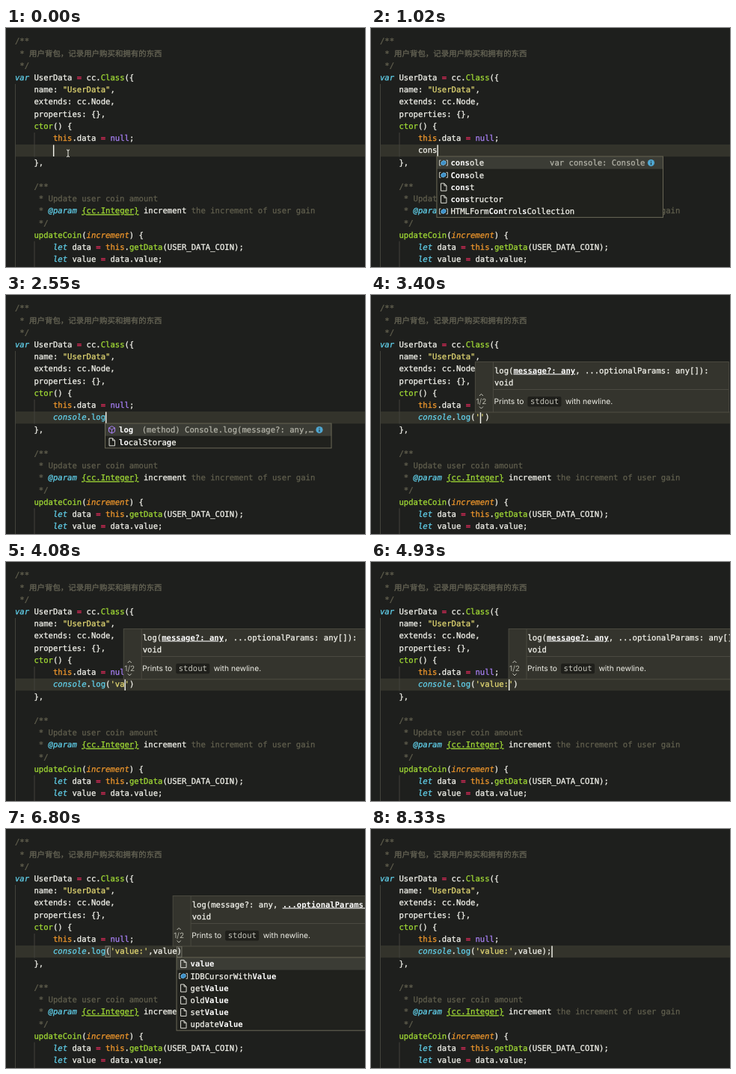
An HTML page for the animation above (8500 ms loop, 480 by 320 pixels).

```html
<!DOCTYPE html>
<html lang="en">
<head>
<meta charset="utf-8">
<title>Typing a console.log call</title>
<style>
html, body { margin: 0; width: 100%; height: 100%; overflow: hidden; background: #1e1f1d; }
svg { display: block; width: 480px; height: 320px; }
text {
  font: 10.58px "DejaVu Sans Mono", "Noto Sans CJK SC", "Noto Sans CJK", monospace;
  white-space: pre; text-rendering: geometricPrecision; stroke-width: .25px;
}
.w { fill: #f5f5ee; stroke: #f5f5ee; }
.c { fill: #615f4e; stroke: #615f4e; }
.z { fill: #6a6858; stroke: #6a6858; font-size: 10.45px; }
.k { fill: #62d3ee; stroke: #62d3ee; font-style: italic; }
.f { fill: #62d3ee; stroke: #62d3ee; }
.g { fill: #a2dc35; stroke: #a2dc35; }
.s { fill: #e3d873; stroke: #e3d873; }
.o { fill: #f59a2c; stroke: #f59a2c; }
.a { fill: #f59a2c; stroke: #f59a2c; font-style: italic; }
.r { fill: #ee2c5f; stroke: #ee2c5f; }
.p { fill: #a880f5; stroke: #a880f5; }
.d { fill: #b3b3a8; stroke: #b3b3a8; }
.m { fill: #c4c4ba; }
.b { fill: #fff; font-weight: bold; }
.u { text-decoration: underline; text-decoration-skip-ink: none; }
.doc { fill: #f0f0e8; font-family: Inter, Roboto, sans-serif; font-size: 10.25px; }
.num { fill: #b8b8ac; font-family: Inter, Roboto, sans-serif; font-size: 10px; text-anchor: middle; }
</style>
</head>
<body>
<svg viewBox="0 0 480 320" xmlns="http://www.w3.org/2000/svg">
  <rect width="480" height="320" fill="#1e1f1d"/>
  <rect x="12" y="156" width="468" height="16.2" fill="#33332b"/>
  <path d="M12.5 75V320M38 140V172.500M38 285.500V320" stroke="#43433c" fill="none"/>
  <g id="code"></g>
  <g id="live"></g>
  <path id="mouse" d="M81 163q2 0 2 1.500q0-1.500 2-1.500M83 164V171.500M81 172.500q2 0 2-1.500q0 1.500 2 1.500" stroke="#e8e8e0" fill="none"/>
</svg>
<script>
const LOOP = 8500, CW = 6.37, LH = 16.22, LEFT = 12, TOP = 10;
const $ = id => document.getElementById(id);
const colX = col => LEFT + col * CW;
const baseY = row => TOP + row * LH + 11.3;
const esc = s => s.replace(/&/g, '&amp;').replace(/</g, '&lt;');

// parts alternate: class, string, class, string ...
function text(x, y, parts, attr = '') {
  let out = '';
  for (let i = 0; i < parts.length; i += 2)
    out += `<tspan class="${parts[i]}">${esc(parts[i + 1])}</tspan>`;
  return `<text x="${x}" y="${y}" ${attr}>${out}</text>`;
}
const rect = (x, y, w, h, fill, stroke = 'none') =>
  `<rect x="${x}" y="${y}" width="${w}" height="${h}" fill="${fill}" stroke="${stroke}"/>`;
const path = (d, stroke, fill = 'none') => `<path d="${d}" stroke="${stroke}" fill="${fill}"/>`;

const lines = [
  [0, 0, 'c', '/**'],
  [1, 1, 'c', '* ', 'z', '用户背包，记录用户购买和拥有的东西'],
  [2, 1, 'c', '*/'],
  [3, 0, 'k', 'var', 'w', ' UserData ', 'r', '=', 'w', ' cc.', 'g', 'Class', 'w', '({'],
  [4, 4, 'w', 'name: ', 's', '"UserData"', 'w', ','],
  [5, 4, 'w', 'extends: cc.Node,'],
  [6, 4, 'w', 'properties: {},'],
  [7, 4, 'g', 'ctor', 'w', '() {'],
  [8, 8, 'o', 'this', 'w', '.data ', 'r', '=', 'w', ' ', 'p', 'null', 'w', ';'],
  [10, 4, 'w', '},'],
  [12, 4, 'c', '/**'],
  [13, 5, 'c', '* Update user coin amount'],
  [14, 5, 'c', '* ', 'k', '@param', 'w', ' ', 'g u', '{cc.Integer}', 'w', ' increment',
    'c', ' the increment of user gain'],
  [15, 5, 'c', '*/'],
  [16, 4, 'g', 'updateCoin', 'w', '(', 'a', 'increment', 'w', ') {'],
  [17, 8, 'k', 'let', 'w', ' data ', 'r', '=', 'w', ' ', 'o', 'this', 'w', '.', 'g', 'getData',
    'w', '(USER_DATA_COIN);'],
  [18, 8, 'k', 'let', 'w', ' value ', 'r', '=', 'w', ' data.value;']
];
$('code').innerHTML = lines.map(([row, col, ...p]) => text(colX(col), baseY(row), p)).join('');

// completion lists: icon kind (v variable, m method, t text) and word
const kinds = (kind, words) => words.split(' ').map(word => ({ kind, word }));
const lists = {
  names: [
    ...kinds('v', 'console Console HTMLFormControlsCollection'),
    ...kinds('t', 'cc const continue constructor confirm class case catch ctor coin'),
    ...kinds('v', 'clearInterval caches')
  ],
  members: [
    ...kinds('m', 'assert clear count debug dir error group info log table time trace warn'),
    ...kinds('t', 'localStorage reload clone')
  ],
  values: [
    ...kinds('t', 'value'), ...kinds('v', 'IDBCursorWithValue'),
    ...kinds('t', 'getValue oldValue setValue updateValue var void validate visible'),
    ...kinds('v', 'navigator devicePixelRatio')
  ]
};
const details = {
  console: 'var console: Console',
  log: '(method) Console.log(message?: any,…'
};

// split a word into matched (bold) and plain runs, or null without a match
function match(word, query) {
  const parts = [];
  let n = 0;
  for (const ch of word) {
    const hit = n < query.length && ch.toLowerCase() === query[n];
    if (hit) n++;
    parts.push(hit ? 'b' : 'w', ch);
  }
  return n === query.length ? parts : null;
}

function icon(kind, x, y) {
  if (kind === 'm')
    return path(`M${x} ${y - 5}l4 2.300v5l-4 2.300l-4-2.300v-5zM${x - 4} ${y - 2.7}l4 2.300l4-2.300M${x} ${y - .4}v4.700`, '#a880f5');
  if (kind === 't')
    return path(`M${x - 3.5} ${y - 5}h4.500l3 3v7h-7.500zM${x + 1} ${y - 5}v3h3`, '#deded6');
  return path(`M${x - 3.5} ${y - 3.5}h-2v7h2M${x + 3.5} ${y - 3.5}h2v7h-2`, '#c8c8c0') +
    path(`M${x - 3} ${y - 1}l3-2l3 1v3l-3 2l-3-1z`, '#5fb4e8', '#3f8fc6');
}

function popup(name, query, x) {
  const starts = it => it.word.toLowerCase().startsWith(query) ? 0 : 1;
  const items = lists[name]
    .map(it => ({ ...it, parts: match(it.word, query) }))
    .filter(it => it.parts)
    .sort((a, b) => starts(a) - starts(b))
    .slice(0, 12);
  const y = 172.5, w = 302.5;
  let out = rect(x, y, w, items.length * LH, '#20211d') + rect(x, y, w, LH, '#3b3c35');
  items.forEach((it, i) => {
    const mid = y + LH * (i + .5);
    out += icon(it.kind, x + 9, mid) + text(x + 18.5, mid + 3.7, it.parts);
  });
  const note = details[items[0].word];
  if (note) {
    const mid = y + LH / 2;
    out += text(x + 278.5, mid + 3.7, ['d', note], 'text-anchor="end"') +
      `<circle cx="${x + 286.5}" cy="${mid}" r="4.600" fill="#4fa6d0"/>` +
      path(`M${x + 286.5} ${mid - 2.8}v1.200M${x + 286.5} ${mid - .7}v3.500`, '#20211d');
  }
  return out + rect(x, y - .5, w, items.length * LH + .5, 'none', '#6c6a58');
}

function hint(x, second) {
  const tx = x + 25.5, cx = x + 8;
  const mark = on => on ? 'b u' : 'w';
  return rect(x, 89.5, 339, 67.5, '#34342d', '#62605299') +
    path(`M${x + 24} 90V157M${x + 24} 126.500H${x + 339}`, '#4b4a41') +
    text(tx, 104.5, ['w', 'log(', mark(!second), 'message?: any', 'w', ', ',
      mark(second), '...optionalParams: any[]', 'w', '):']) +
    text(tx, 120.7, ['w', 'void']) +
    `<text class="doc" x="${tx - .5}" y="146">Prints to</text>` +
    `<rect x="${x + 70}" y="136" width="45" height="13.500" rx="2" fill="#1f1f1b"/>` +
    text(x + 73.5, 146, ['m', 'stdout']) +
    `<text class="doc" x="${x + 120.5}" y="146">with newline.</text>` +
    `<text class="num" x="${cx}" y="146">1/2</text>` +
    path(`M${cx - 2.5} 135l2.500-2.500l2.500 2.500M${cx - 2.5} 149.500l2.500 2.500l2.500-2.500`, '#c8c8be');
}

function tokens(s) {
  const parts = [];
  for (const t of s.match(/console\b|log\b|'[^']*'|\w+|./g) || [])
    parts.push(t === 'console' ? 'k' : t === 'log' ? 'f' : t[0] === "'" ? 's' : 'w', t);
  return parts;
}

// time, text before the caret, text after it, completion list, hint column, caret off
const call = "console.log(", str = call + "'value:";
const steps = [
  [0, '', ''],
  [340, 'c', ''],
  [510, 'c', '', 'names'],
  [680, 'co', '', 'names'],
  [850, 'con', '', 'names'],
  [1020, 'cons', '', 'names'],
  [1190, 'conso', '', 'names'],
  [1360, 'consol', '', 'names'],
  [1700, 'console', '', 'names'],
  [1870, 'console.', ''],
  [2040, 'console.', '', 'members'],
  [2210, 'console.l', '', 'members'],
  [2380, 'console.lo', '', 'members'],
  [2550, 'console.log', '', 'members'],
  [2720, 'console.log', ''],
  [3060, call, ')'],
  [3230, call, ')', '', 20],
  [3400, call + "'", "')", '', 20],
  [3570, call + "'", "')", '', 21],
  [3740, call + "'v", "')", '', 22],
  [4080, call + "'va", "')", '', 22.8],
  [4250, call + "'val", "')", '', 24],
  [4420, call + "'valu", "')", '', 25],
  [4590, call + "'value", "')", '', 25],
  [4760, call + "'value", "')", '', 26],
  [4930, str, "')", '', 27],
  [5270, str + "'", ')', '', 27],
  [5440, str + "'", ')', '', 28],
  [5780, str + "',", ')', '', 28],
  [5950, str + "',", ')', '', 29],
  [6460, str + "',v", ')', 'values', 30],
  [6630, str + "',val", ')', 'values', 32],
  [6800, str + "',value", ')', 'values', 33.15, true],
  [6970, str + "',value", ')', 'values', 34],
  [7650, str + "',value)", '', '', 34],
  [7820, str + "',value)", ''],
  [7990, str + "',value);", '']
];

function draw([, before, after, list, hintCol, caretOff]) {
  const line = before + after, caret = colX(8 + before.length);
  let out = '';
  if (after[0] === ')' || before.endsWith(')'))
    for (const i of [line.indexOf('('), line.lastIndexOf(')')])
      out += rect(colX(8 + i), 157, CW, 14.5, '#3b3c34', '#77776c');
  out += text(colX(8), baseY(9), tokens(line));
  if (!caretOff) out += rect(caret, 156.5, 1.4, 15.5, '#f8f8f0');
  if (hintCol) out += hint(colX(hintCol), before.includes(','));
  if (list) out += popup(list, before.match(/\w*$/)[0], caret - .5);
  $('live').innerHTML = out;
}

let shown = null;
function frame(now) {
  const t = now % LOOP;
  const step = steps.findLast(s => s[0] <= t);
  if (step !== shown) {
    shown = step;
    draw(step);
    $('mouse').style.display = step === steps[0] ? '' : 'none';
  }
  requestAnimationFrame(() => frame(performance.now() - start));
}
const start = performance.now();
frame(0);
</script>
</body>
</html>
```
